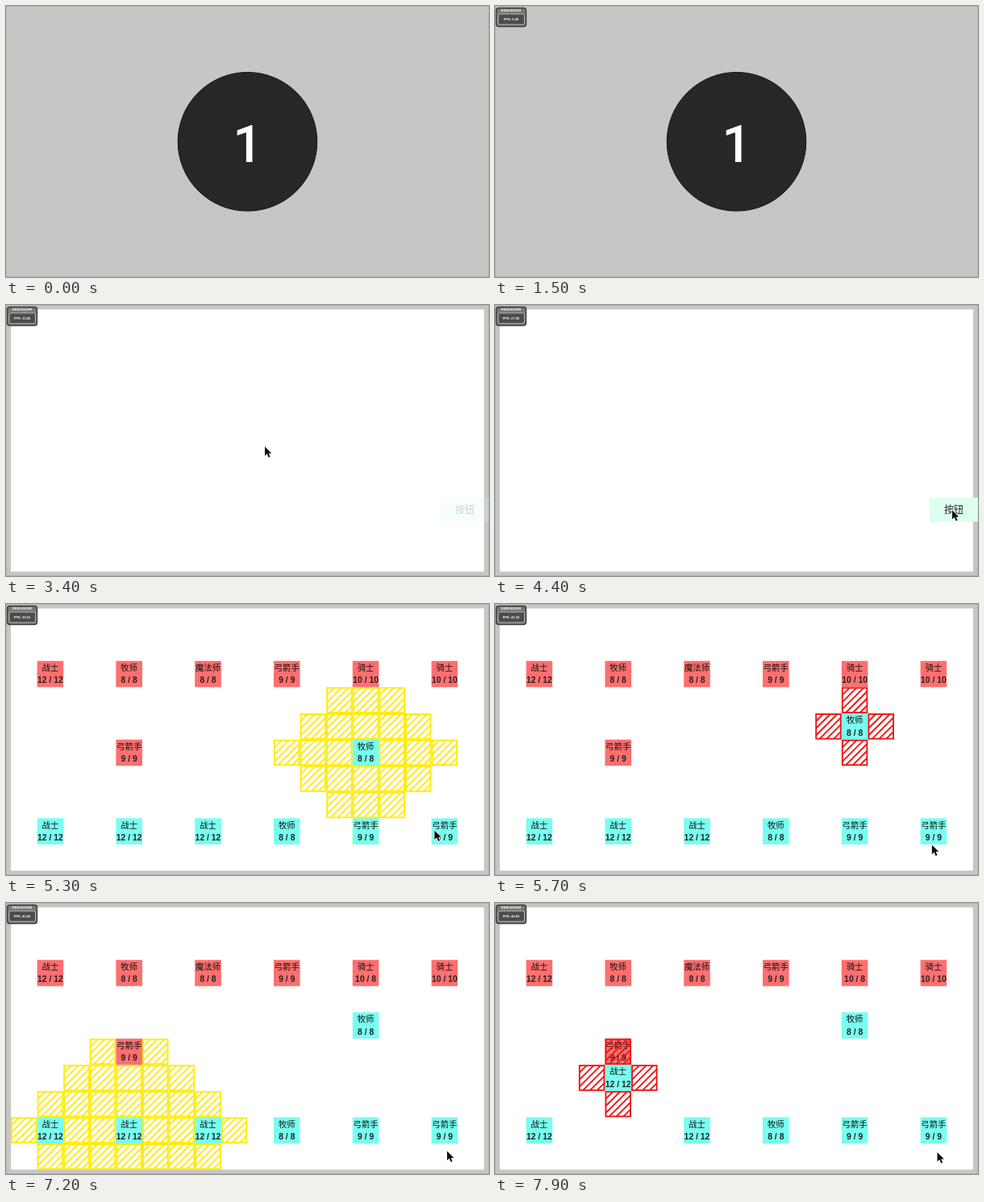
An HTML page that plays this animation: 599x337 px, repeating every 8 s.

```html
<!DOCTYPE html>
<html lang="zh">
<head>
<meta charset="utf-8">
<title>Grid tactics</title>
<style>
  html, body { margin: 0; width: 100%; height: 100%; overflow: hidden; background: #c6c6c6; }
  svg { display: block; width: 599px; height: 337px; }
  text { font-family: "Liberation Sans", Arial, sans-serif; text-anchor: middle; }
  .cjk { font-family: "Noto Sans CJK SC", "Noto Sans CJK", "Noto Sans CJK JP", sans-serif; font-weight: 500; }
  .bold { font-weight: 700; }
</style>
</head>
<body>
<svg id="stage" viewBox="0 0 599 337"></svg>
<script>
const LOOP = 8000, STEP = 100;
const CELL = 32.6, LEFT = 6, TOP = 5.6, COLS = 18, ROWS = 10;
const stage = document.getElementById('stage');

function add(parent, tag, attrs = {}, content) {
  const el = document.createElementNS('http://www.w3.org/2000/svg', tag);
  for (const key in attrs) el.setAttribute(key, attrs[key]);
  if (content !== undefined) el.textContent = content;
  return parent.appendChild(el);
}
const group = (parent = stage) => add(parent, 'g');
const show = (el, on) => el.setAttribute('display', on ? 'inline' : 'none');
const fade = (el, alpha) => { show(el, alpha > 0); el.setAttribute('opacity', alpha); };
const place = (el, x, y) => el.setAttribute('transform', `translate(${x} ${y})`);
const placeCell = (el, col, row) => place(el, LEFT + col * CELL, TOP + row * CELL);
const ramp = (t, from, to) => Math.min(1, Math.max(0, (t - from) / (to - from)));
const within = (t, from, to) => t >= from && t < to;

// Value of a list of [time, ...values] at time t
function track(points, t, ease = k => k) {
  const next = points.findIndex(p => p[0] > t);
  if (next === 0) return points[0].slice(1);
  if (next < 0) return points[points.length - 1].slice(1);
  const a = points[next - 1], b = points[next];
  const k = ease((t - a[0]) / (b[0] - a[0]));
  return a.slice(1).map((v, i) => v + (b[i + 1] - v) * k);
}
const smooth = k => k * k * (3 - 2 * k);

// Scene layers
add(stage, 'rect', { width: 599, height: 337, fill: '#c6c6c6' });
add(stage, 'rect', { x: 0.5, y: 0.5, width: 598, height: 336, fill: 'none', stroke: '#b4b4b4' });

const countdown = group();
add(countdown, 'circle', { cx: 299.5, cy: 168.7, r: 86.3, fill: '#272727', stroke: '#161616' });
add(countdown, 'text', {
  x: 281.5, y: 193.5, fill: '#fff', 'font-size': 64, 'font-weight': 500,
  style: 'font-family: Roboto, sans-serif; text-anchor: start'
}, '1');

function button(x, y, width, height, label, attrs) {
  const g = group();
  add(g, 'rect', { x, y, width, height, fill: '#dcffee' });
  add(g, 'text', { x: x + width / 2, fill: '#222', ...attrs }, label);
  return g;
}
const startButton = button(253, 146, 93, 45, 'Start', { y: 173, 'font-size': 12.5, class: 'bold' });

const board = group();
add(board, 'rect', { x: LEFT, y: 5.5, width: COLS * CELL, height: ROWS * CELL, fill: '#fff' });
const moveLayer = group(board), unitLayer = group(board), attackLayer = group(board);

const actionButton = button(539, 239.5, 60, 30, '按钮', { y: 258.6, 'font-size': 12, class: 'cjk' });

// Units
const RED = '#ff6f6f', CYAN = '#78fff0';
const HP = { 战士: 12, 牧师: 8, 魔法师: 8, 弓箭手: 9, 骑士: 10 };
const units = [];

function addUnit(name, col, row, color) {
  const el = group(unitLayer), max = HP[name];
  add(el, 'rect', { width: CELL, height: CELL, fill: color });
  add(el, 'text', { x: 16.3, y: 12.2, 'font-size': 10.4, class: 'cjk', fill: '#111' }, name);
  const hp = add(el, 'text', { x: 16.3, y: 27.7, 'font-size': 10.4, class: 'bold', fill: '#222' }, `${max} / ${max}`);
  placeCell(el, col, row);
  const unit = { el, hp, col, row, color };
  units.push(unit);
  return unit;
}
const lineUp = (names, row, color) =>
  names.split(' ').map((name, i) => addUnit(name, 1 + 3 * i, row, color));

const foes = lineUp('战士 牧师 魔法师 弓箭手 骑士 骑士', 2, RED);
addUnit('弓箭手', 4, 5, RED);
const priest = addUnit('牧师', 13, 5, CYAN);
const warrior = lineUp('战士 战士 战士 牧师 弓箭手 弓箭手', 8, CYAN)[1];
const knight = foes[4];

// Hatched cells
const SIDES = [[1, 0], [-1, 0], [0, 1], [0, -1]];

function hatch(parent, col, row, color) {
  const g = group(parent), size = 30.6;
  let d = '';
  for (let k = 1; k < 7; k++) {
    const sum = 2 * size * k / 7, far = Math.min(sum, size), near = sum - far;
    d += `M${near + 1} ${far + 1}L${far + 1} ${near + 1}`;
  }
  add(g, 'rect', { x: 1, y: 1, width: size, height: size, fill: 'none', stroke: color, 'stroke-width': 1.9 });
  add(g, 'path', { d, fill: 'none', stroke: color, 'stroke-width': 1.9 });
  placeCell(g, col, row);
}

// Cells reachable in a number of steps; foes block the way
function moveRange(unit, steps) {
  const g = group(moveLayer), seen = new Set([unit.col + ',' + unit.row]);
  const blocked = (c, r) => units.some(u => u.color === RED && u.col === c && u.row === r);
  let edge = [[unit.col, unit.row]];
  for (let i = 0; i < steps; i++) {
    const grown = [];
    for (const [c, r] of edge) for (const [dc, dr] of SIDES) {
      const x = c + dc, y = r + dr, key = x + ',' + y;
      if (x < 0 || y < 0 || x >= COLS || y >= ROWS || seen.has(key) || blocked(x, y)) continue;
      seen.add(key);
      grown.push([x, y]);
    }
    edge = grown;
  }
  for (const key of seen) hatch(g, ...key.split(',').map(Number), '#ffeb0a');
  return g;
}

function attackRange(col, row) {
  const g = group(attackLayer);
  for (const [dc, dr] of SIDES) hatch(g, col + dc, row + dr, '#f01414');
  return g;
}

const turns = [
  { unit: priest, pick: 4700, range: 5000, move: 5500, attack: 5600, end: 5900, toRow: 4, steps: 3 },
  { unit: warrior, pick: 6000, range: 6700, move: 7400, attack: 7700, end: LOOP, toRow: 6, steps: 4 }
];
for (const turn of turns) {
  turn.moveCells = moveRange(turn.unit, turn.steps);
  turn.attackCells = attackRange(turn.unit.col, turn.toRow);
  turn.marker = group(board);
  add(turn.marker, 'path', {
    d: 'M-2.5 7V-2.5H7M25.6 -2.5H35.1V7M35.1 25.6V35.1H25.6M7 35.1H-2.5V25.6',
    fill: 'none', stroke: '#ffac45', 'stroke-width': 2.4
  });
  placeCell(turn.marker, turn.unit.col, turn.unit.row);
}

// Frame rate panel
const panel = group();
add(panel, 'rect', { x: 1.5, y: 2.5, width: 37, height: 23, rx: 3, fill: '#777', stroke: '#3c3c3c', 'stroke-width': 1.4 });
add(panel, 'rect', { x: 4, y: 10, width: 32.5, height: 13, rx: 2, fill: '#4c4c4c', stroke: '#bdbdbd', 'stroke-width': 0.9 });
add(panel, 'text', { x: 20, y: 7, 'font-size': 4.3, class: 'bold', fill: '#fff' }, 'DEBUGGER');
const rate = add(panel, 'text', { x: 20, y: 18, 'font-size': 4.1, class: 'bold', fill: '#fff' });
const RATES = [[1500, 0.8], [2400, 5.49], [3400, 15.45], [5300, 39.15], [6200, 44.03], [7200, 45.45], [7900, 46.6]];

// Pointer
const pointer = group();
add(pointer, 'path', {
  d: 'M0 0V11.6L2.7 9.1L4.7 13.6L6.7 12.7L4.8 8.4H8.4Z',
  fill: '#111', stroke: '#fff', 'stroke-width': 1.6, 'paint-order': 'stroke', 'stroke-linejoin': 'round'
});
const POINTER = [
  [1900, 500, 308], [2300, 455, 231], [2400, 403.7, 230.5], [2800, 321, 176], [3500, 321, 176],
  [4200, 567, 255], [4500, 567, 255], [5200, 530.7, 280.3], [6000, 547, 308.5], [7200, 547, 308.5], [7900, 548.5, 310]
];

function render(t) {
  fade(countdown, 1 - ramp(t, 1500, 1800));
  fade(startButton, t < 3300 ? ramp(t, 2300, 3000) : 0);
  show(board, t >= 3300);
  fade(actionButton, ramp(t, 3300, 3800) * (1 - ramp(t, 4500, 4800)));
  fade(unitLayer, ramp(t, 4400, 4700));
  for (const { unit, pick, range, move, attack, end, toRow, moveCells, attackCells, marker } of turns) {
    show(marker, within(t, pick, range));
    show(moveCells, within(t, range, move));
    show(attackCells, within(t, attack, end));
    placeCell(unit.el, unit.col, unit.row + (toRow - unit.row) * ramp(t, move, attack));
  }
  knight.hp.textContent = t < 5900 ? '10 / 10' : '10 / 8';
  show(panel, t >= 1500);
  rate.textContent = 'FPS: ' + track(RATES, t)[0].toFixed(2);
  show(pointer, t >= 1900);
  place(pointer, ...track(POINTER, t, smooth));
}

const began = performance.now();
function tick() {
  const t = (performance.now() - began) % LOOP;
  render(Math.floor(t / STEP) * STEP);
  requestAnimationFrame(tick);
}
tick();
</script>
</body>
</html>
```
